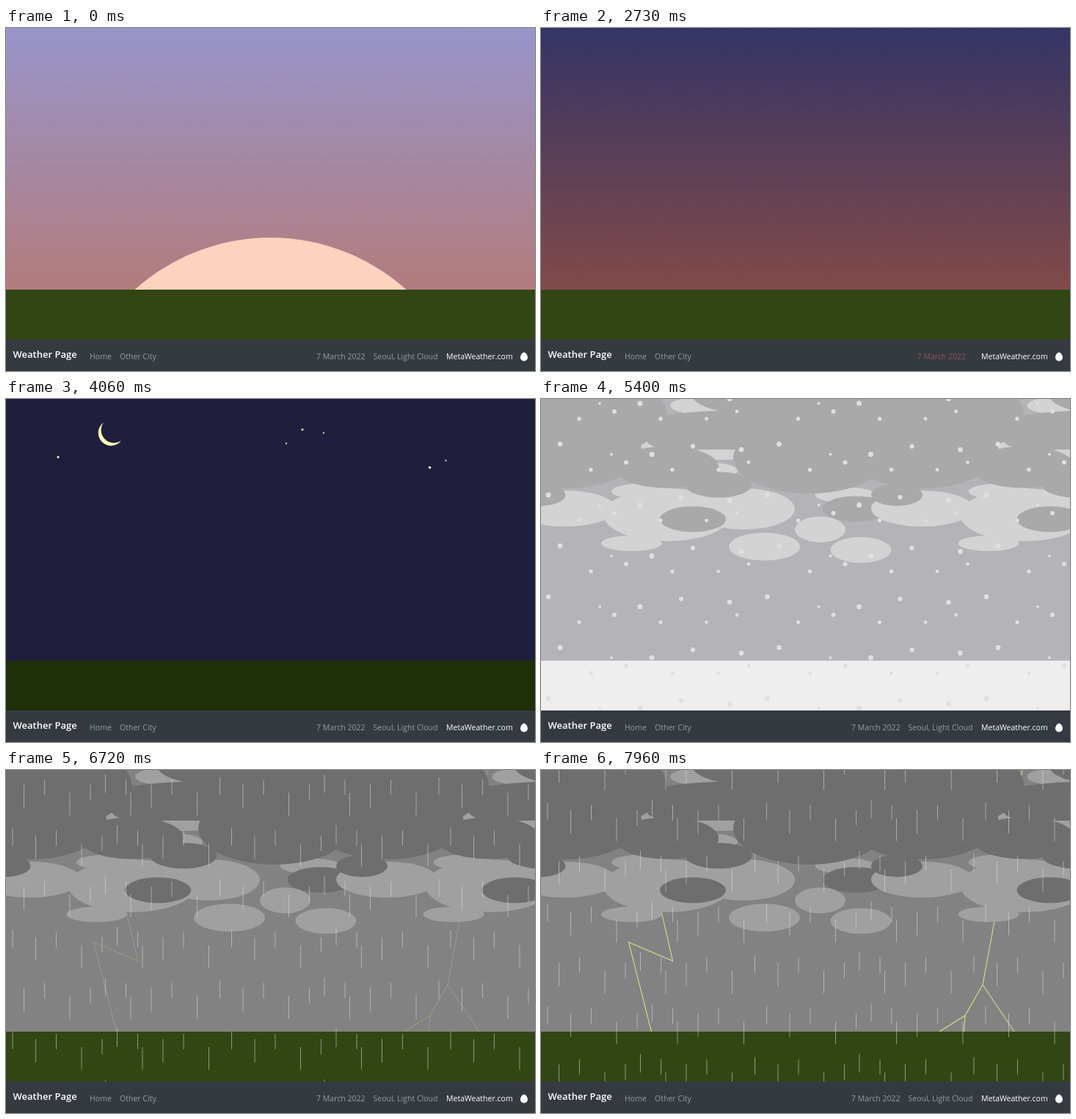
An HTML page that plays this animation: 721x468 px, repeating every 8 s.

```html
<!DOCTYPE html>
<html lang="en">
<head>
<meta charset="utf-8">
<title>Weather Page</title>
<style>
  html, body { margin: 0; width: 100%; height: 100%; overflow: hidden; }
  svg { display: block; }
  text { font: 10.55px "Open Sans", "Noto Sans", sans-serif; fill: #fff; }
  .brand { font-size: 13px; font-weight: 600; }
  .link { fill: #999c9f; }
  .light { fill: var(--light); }
  .dark { fill: var(--dark); }
  #snow { --light: #d3d3d3; --dark: #a9a9a9; }
  #storm { --light: #a0a0a0; --dark: #6e6e6e; }
  #flakes { fill: #dfdfdf; }
  #drops { stroke: #ddd; stroke-opacity: .55; }
  #bolts { fill: none; stroke: #d8de84; stroke-width: 1.1; }
</style>
</head>
<body>
<svg width="721" height="468" viewBox="0 0 721 468">
  <defs>
    <linearGradient id="dawnSky" x2="0" y2="1">
      <stop stop-color="#9895ca"/><stop offset="1" stop-color="#b27c7d"/>
    </linearGradient>
    <linearGradient id="duskSky" x2="0" y2="1">
      <stop stop-color="#343465"/><stop offset="1" stop-color="#824a4a"/>
    </linearGradient>
    <g id="cloud">
      <g class="light">
        <ellipse cx="415" cy="131" rx="41.5" ry="10.5"/>
        <ellipse cx="217" cy="9" rx="41" ry="11.5"/>
        <ellipse cx="147" cy="63" rx="25" ry="10"/>
        <ellipse cx="245" cy="75" rx="41" ry="8"/>
        <ellipse cx="233" cy="98" rx="35" ry="11"/>
      </g>
      <ellipse class="dark" cx="429" cy="150" rx="45.5" ry="17.5"/>
      <g class="light">
        <ellipse cx="33" cy="149.5" rx="69.5" ry="24.5"/>
        <ellipse cx="172" cy="158" rx="87" ry="36"/>
        <ellipse cx="277" cy="150" rx="69" ry="28"/>
        <ellipse cx="123.5" cy="197" rx="41.5" ry="10.5"/>
        <ellipse cx="304.5" cy="201.5" rx="48.5" ry="19"/>
        <ellipse cx="380.5" cy="178" rx="34.5" ry="17.5"/>
        <ellipse cx="436" cy="206" rx="41.5" ry="17.5"/>
        <ellipse cx="137.5" cy="126" rx="41.5" ry="10.5"/>
      </g>
      <g class="dark">
        <path fill-rule="evenodd" d="M-1 0H163Q171 8 172 22Q205 17 242 16Q215 10 208 0H487V69H-1ZM136 63Q141 61 144 58Q148 64 158 66L137 69Z"/>
        <ellipse cx="33" cy="70" rx="104" ry="52"/>
        <ellipse cx="171" cy="93" rx="71" ry="28.5"/>
        <ellipse cx="242" cy="117" rx="45.5" ry="17.5"/>
        <ellipse cx="366" cy="80" rx="104" ry="49"/>
        <ellipse cx="-1.5" cy="131" rx="35" ry="15"/>
        <ellipse cx="207" cy="164" rx="45" ry="17.5"/>
      </g>
    </g>
    <g id="clouds">
      <use href="#cloud" x="-486.5"/><use href="#cloud"/><use href="#cloud" x="486.5"/>
    </g>
  </defs>

  <rect id="sky" width="721" height="357"/>
  <circle id="sun" cx="360.5" cy="562.5" r="276.5" fill="#fbd3be"/>
  <g id="night" fill="#ffffb8">
    <path d="M133 32A17.5 17.5 0 1 0 157 57A17.6 17.6 0 0 1 133 32Z"/>
    <circle cx="71" cy="79.3" r="1.5"/><circle cx="382" cy="60.6" r="1.1"/>
    <circle cx="404" cy="41.7" r="1.5"/><circle cx="433" cy="46.3" r="1.1"/>
    <circle cx="577.6" cy="93.5" r="1.8"/><circle cx="599.5" cy="84" r="1.1"/>
  </g>
  <path id="bolts" d="M160 175L165 197L179.500 260.500L119.500 235L150.500 357M656 0L602 293L578 335L543 357M578 335L576.500 357M602 293L645 357"/>
  <rect id="ground" y="357" width="721" height="68"/>
  <g id="snow"><use href="#clouds"/><g id="flakes"></g></g>
  <g id="storm"><use href="#clouds"/><g id="drops"></g></g>

  <rect y="425" width="721" height="43" fill="#343a40"/>
  <text class="brand" x="9.500" y="450">Weather Page</text>
  <text class="link" x="114" y="452">Home</text>
  <text class="link" x="155" y="452">Other City</text>
  <text class="link" id="date" y="452">7 March 2022</text>
  <text class="link" id="place" x="500.500" y="452">Seoul, Light Cloud</text>
  <text x="600" y="452">MetaWeather.com</text>
  <path fill="#fff" d="M706 442.500c2.500 0 5 4 5 7a5 5 0 0 1-10 0c0-3 2.500-7 5-7z"/>
</svg>
<script>
const $ = id => document.getElementById(id);
const LOOP = 8000, TILE_W = 298.5, TILE_H = 138.8;

const scenes = [
  { at: 0, sky: 'url(#dawnSky)', ground: '#324614', show: 'sun' },
  { at: 1390, sky: '#a4cbec', ground: '#446e1e' },
  { at: 2730, sky: 'url(#duskSky)', ground: '#324614' },
  { at: 4060, sky: '#1f1e3c', ground: '#20300a', show: 'night' },
  { at: 5400, sky: '#b3b3b8', ground: '#eee', show: 'snow' },
  { at: 6720, sky: '#828282', ground: '#324614', show: 'storm' },
];

// x, y, radius
const flakes = [[10, 131, 3.4], [52, 27, 2.7], [80, 6, 2], [100, 17, 3], [135, 6, 3.5],
  [163, 27, 2.7], [191, 134, 3.1], [225.5, 27, 2.4], [257, 138.5, 3.4], [267, 17, 2.4]];
// x, y, length
const drops = [[24.5, 20, 32], [52.5, 13, 21], [87, 31, 31], [115, 20, 21], [135.5, 6, 25],
  [163.5, 13, 21], [170, 31, 31], [198, 20, 32], [226, 13, 21], [260.5, 31, 31], [291.5, 10, 24]];

// Each item appears twice per tile, the second copy half a tile lower.
function scatter(items, draw) {
  let out = '';
  for (const [x, y, size] of items)
    for (let col = -1; col < 3; col++)
      for (let row = -2; row < 8; row++)
        out += draw(x + col * TILE_W + (row & 1) * 16, y + row * TILE_H / 2, size);
  return out;
}
$('flakes').innerHTML = scatter(flakes, (x, y, r) => `<circle cx="${x}" cy="${y}" r="${r}"/>`);
$('drops').innerHTML = scatter(drops, (x, y, h) => `<path d="M${x} ${y}v${h}"/>`);

const show = (id, on) => $(id).setAttribute('visibility', on ? 'visible' : 'hidden');
const shift = (id, x, y) => $(id).setAttribute('transform', `translate(${x} ${y})`);

function ramp(points, t) {
  const i = points.findIndex(p => p[0] > t);
  if (i < 0) return points.at(-1)[1];
  const [t0, a] = points[i - 1], [t1, b] = points[i];
  return a + (b - a) * (t - t0) / (t1 - t0);
}
const flash = [[0, .25], [645, 1], [925, .4], [1205, 1]];

function frame() {
  const now = performance.now() % LOOP;
  const scene = scenes.findLast(s => s.at <= now);
  const t = now - scene.at;

  $('sky').setAttribute('fill', scene.sky);
  $('ground').setAttribute('fill', scene.ground);
  for (const id of ['sun', 'night', 'snow', 'storm']) show(id, scene.show === id);

  const storm = scene.show === 'storm';
  show('bolts', storm);
  if (storm) $('bolts').setAttribute('opacity', ramp(flash, t));

  const swayed = t >= 330 && t < 990;
  shift('flakes', swayed ? -5.5 : 0, swayed ? -TILE_H / 4 : 0);
  shift('drops', 0, t >= 500 ? -TILE_H / 4 : 0);

  const loading = now >= 2730 && now < 3130;
  show('place', !loading);
  $('date').setAttribute('x', loading ? 512.5 : 423);
  $('date').style.fill = loading ? '#94505a' : '';
  requestAnimationFrame(frame);
}
frame();
</script>
</body>
</html>
```
